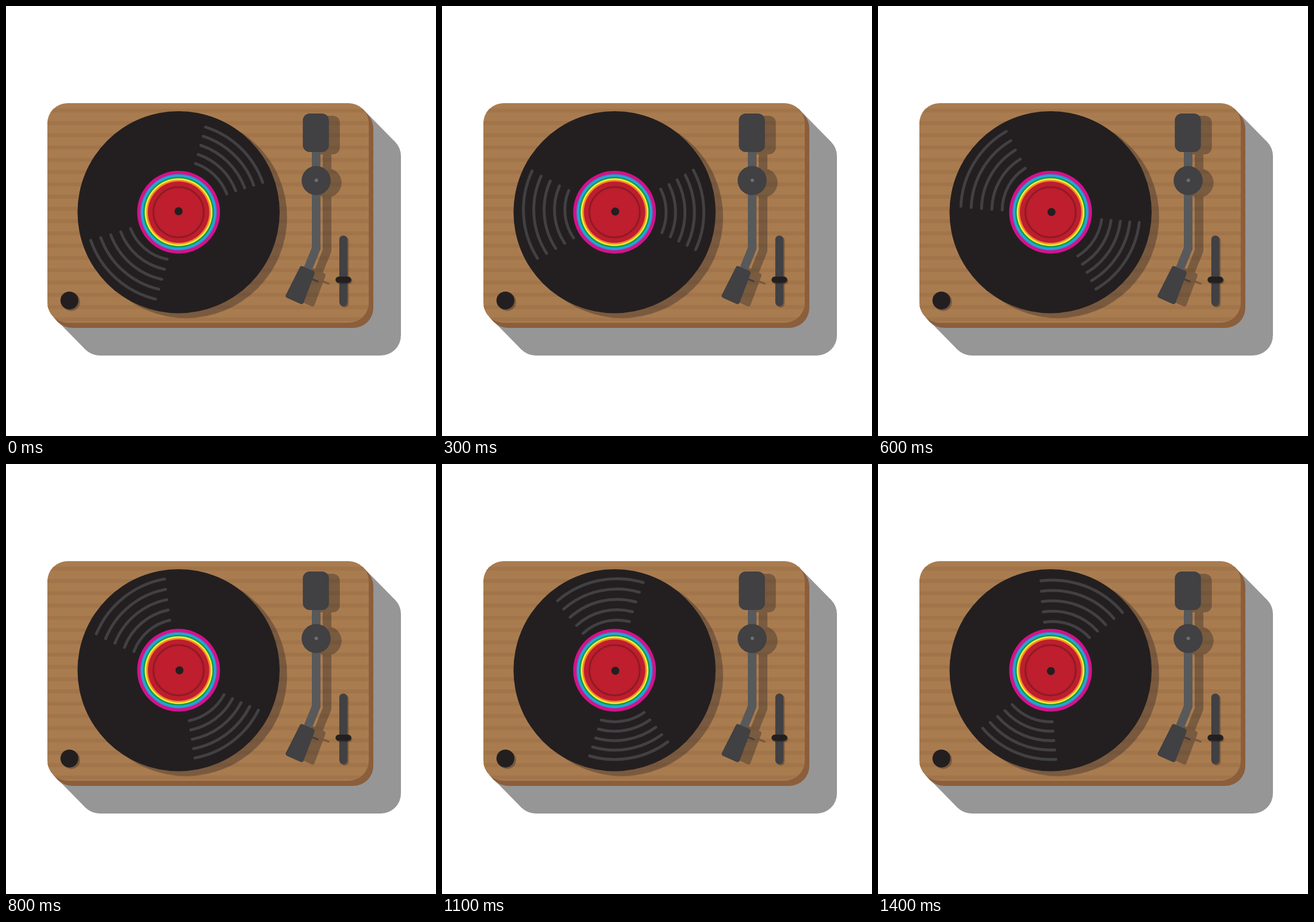
Animation, 748 px wide and 748 px high, one loop 1.5 s. Source, as an HTML page with a canvas:

```html
<!DOCTYPE html>
<html lang="en">
<head>
<meta charset="utf-8">
<title>Turntable</title>
<style>
  html, body { margin: 0; width: 100%; height: 100%; overflow: hidden; background: #fff; }
  canvas { display: block; width: 748px; height: 748px; }
</style>
</head>
<body>
<canvas id="stage" width="748" height="748"></canvas>
<script>
const SIZE = 748, LOOP = 1500, STEP = 100;
const BLACK = '#231f20', GRAPHITE = '#414042', STEEL = '#58595b';
const DECK = { x: 72, y: 169, w: 559, h: 382, r: 35 };
const DISC = { x: 300.2, y: 358.7, r: 175.8 };
const RINGS = [[72, '#d6118b'], [66.7, '#5a6cae'], [65.2, '#27a3dc'], [61.6, '#0c9c55'],
               [58.9, '#f9ed32'], [56.1, '#f4862b'], [53.4, '#be1e2d']];
// Step index and turn in degrees; the turn slows down, then speeds up again
const TURN = [[0, 0], [1, 17.5], [3, 44.3], [6, 79], [8, 99], [11, 125.8], [14, 159], [15, 180]];

const rad = deg => deg * Math.PI / 180;
const stage = document.getElementById('stage').getContext('2d');

function layer(draw) {
  const canvas = document.createElement('canvas');
  canvas.width = canvas.height = SIZE;
  draw(canvas.getContext('2d'));
  return canvas;
}

function box(c, x, y, w, h, r, color) {
  c.beginPath();
  c.roundRect(x, y, w, h, r);
  c.fillStyle = color;
  c.fill();
}

function dot(c, x, y, r, color) {
  c.beginPath();
  c.arc(x, y, r, 0, 2 * Math.PI);
  c.fillStyle = color;
  c.fill();
}

function line(c, points, width, color) {
  c.beginPath();
  points.forEach(p => c.lineTo(...p));
  c.lineWidth = width;
  c.strokeStyle = color;
  c.stroke();
}

// Draws a part on top of its own flat, offset shadow
function withShadow(c, dx, dy, draw) {
  const part = layer(draw);
  const shade = layer(s => {
    s.drawImage(part, 0, 0);
    s.globalCompositeOperation = 'source-in';
    s.fillStyle = BLACK;
    s.fillRect(0, 0, SIZE, SIZE);
  });
  c.globalAlpha = 0.35;
  c.drawImage(shade, dx, dy);
  c.globalAlpha = 1;
  c.drawImage(part, 0, 0);
}

// Sweeps the deck outline diagonally down to the right
function extrude(c, dx, dy, color) {
  const { x, y, w, h, r } = DECK, k = r * (1 - Math.SQRT1_2);
  const a = [x + w - k, y + k], b = [x + k, y + h - k];
  box(c, x + dx, y + dy, w, h, r, color);
  c.beginPath();
  c.moveTo(...a);
  c.lineTo(a[0] + dx, a[1] + dy);
  c.lineTo(b[0] + dx, b[1] + dy);
  c.lineTo(...b);
  c.fill();
}

function drawDeck(c) {
  const { x, y, w, h, r } = DECK;
  extrude(c, 56, 57, '#969696');
  extrude(c, 8, 9, '#8b5e3c');
  box(c, x, y, w, h, r, '#a97c50');
  c.save();
  c.clip();
  c.fillStyle = '#a1744a';
  for (let i = 0; i < 18; i++) c.fillRect(x, 178.7 + i * 21.35, w, 6.8);
  c.restore();
}

function drawArm(c) {
  line(c, [[539.5, 240], [539.5, 421.5], [524, 460]], 15, STEEL);
  box(c, 516.3, 187, 45.4, 67, 12, GRAPHITE);
  dot(c, 539.5, 303.6, 25.3, GRAPHITE);
  c.lineCap = c.lineJoin = 'round';
  line(c, [[528, 473.5], [542.3, 479]], 3, GRAPHITE);
  c.beginPath();
  [[514.5, 456.5], [532.8, 464.5], [514, 514.5], [490.5, 504]].forEach(p => c.lineTo(...p));
  c.closePath();
  c.lineWidth = 8;
  c.fillStyle = GRAPHITE;
  c.fill();
  c.stroke();
}

const scene = layer(c => {
  c.fillStyle = '#fff';
  c.fillRect(0, 0, SIZE, SIZE);
  drawDeck(c);
  withShadow(c, 13, 8.5, s => dot(s, DISC.x, DISC.y, DISC.r, BLACK));
  withShadow(c, 19, 4, drawArm);
  dot(c, 539.8, 303.3, 3, '#6d6e71');
  withShadow(c, 2.2, 2, s => box(s, 579.8, 399.3, 14, 123, 7, GRAPHITE));
  withShadow(c, 1.6, 2, s => box(s, 573.2, 470.8, 27.4, 10.8, 5.4, BLACK));
  withShadow(c, 3, 2.5, s => dot(s, 110.3, 512.3, 15.6, BLACK));
  RINGS.forEach(([r, color]) => dot(c, DISC.x, DISC.y, r, color));
  c.beginPath();
  c.arc(DISC.x, DISC.y, 43.8, 0, 2 * Math.PI);
  c.lineWidth = 3;
  c.strokeStyle = '#8f1a27';
  c.stroke();
});

function slope(i) {
  const rate = j => (TURN[j + 1][1] - TURN[j][1]) / (TURN[j + 1][0] - TURN[j][0]);
  if (i === 0) return 19;
  if (i === TURN.length - 1) return 22;
  const before = TURN[i][0] - TURN[i - 1][0], after = TURN[i + 1][0] - TURN[i][0];
  return (rate(i - 1) * after + rate(i) * before) / (before + after);
}

// Cubic Hermite interpolation of the turn
function turnAt(step) {
  let i = 0;
  while (step >= TURN[i + 1][0]) i++;
  const [t0, a] = TURN[i], [t1, b] = TURN[i + 1], span = t1 - t0;
  const u = (step - t0) / span, v = 1 - u;
  return a * v * v * (1 + 2 * u) + b * u * u * (1 + 2 * v)
    + span * u * v * (slope(i) * v - slope(i + 1) * u);
}

function groove(c, x, y, r, from, to) {
  c.beginPath();
  c.arc(x, y, r, rad(from), rad(to));
  c.stroke();
}

function render(step) {
  const c = stage;
  c.drawImage(scene, 0, 0);
  c.save();
  c.translate(DISC.x, DISC.y);
  c.rotate(rad(turnAt(step)));
  c.lineCap = 'round';
  c.lineWidth = 5;
  c.strokeStyle = GRAPHITE;
  for (let i = 0; i < 5; i++) {
    groove(c, 0, 0, 155.3 - 16.4 * i, -72.4 + 0.4 * i, -19.5 - 0.35 * i);
    groove(c, -3, -3, 158.5 - 18 * i, 103.5 - 0.55 * i, 160.9 - 0.6 * i);
  }
  dot(c, 0, -1.6, 7, BLACK);
  c.restore();
}

function tick() {
  render(Math.floor(performance.now() % LOOP / STEP));
  requestAnimationFrame(tick);
}
tick();
</script>
</body>
</html>
```
